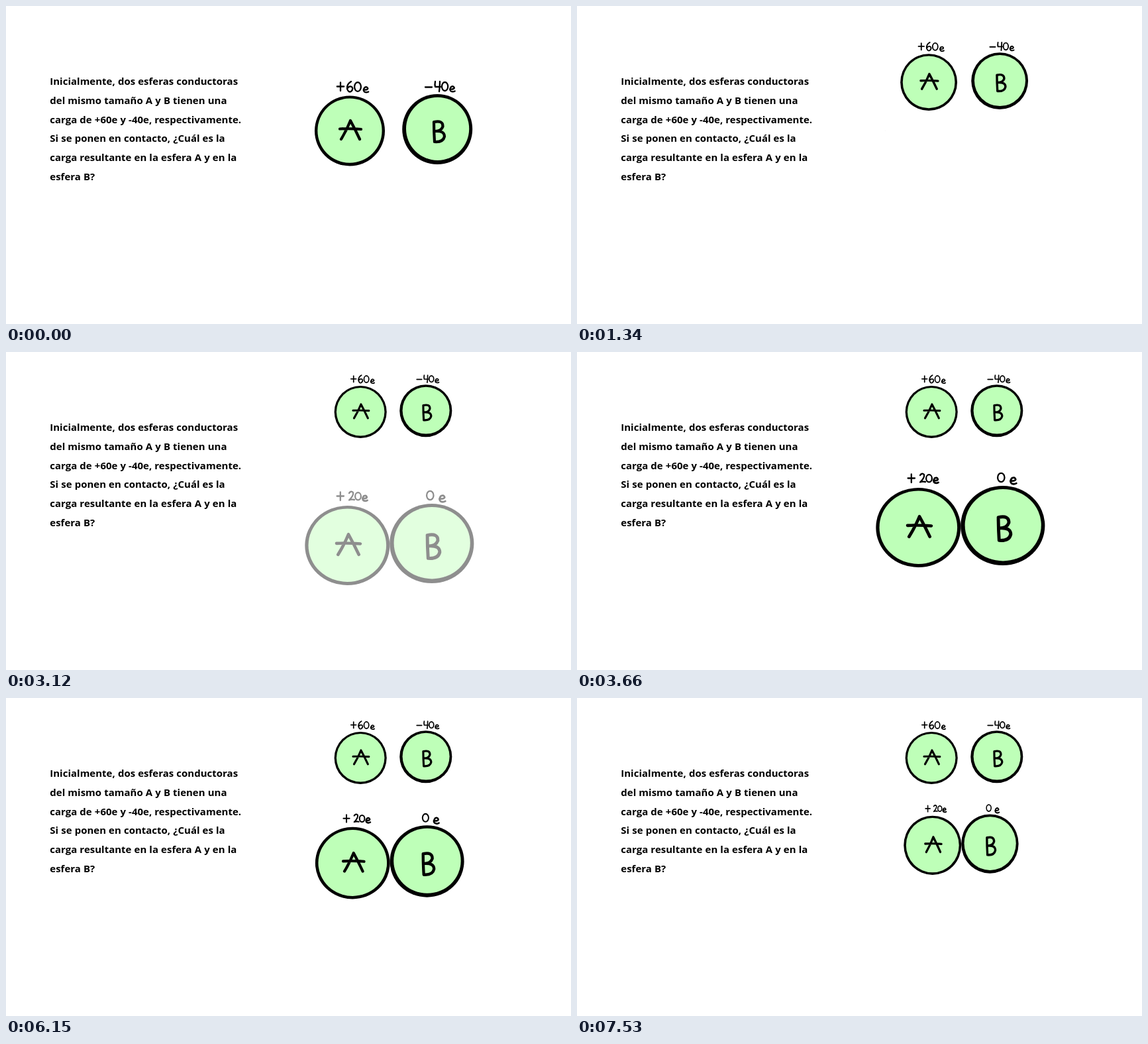
Recreate the animation shown at these times as an HTML page. Size 853 by 480 pixels, loop 8000 ms.

```html
<!DOCTYPE html>
<html lang="es">
<head>
<meta charset="utf-8">
<title>Esferas conductoras</title>
<style>
  html, body { margin: 0; width: 100%; height: 100%; overflow: hidden; background: #fff; }
  svg { display: block; width: 853px; height: 480px; }
  text { font: bold 15px "Open Sans", "Noto Sans", sans-serif; word-spacing: .2px; }
  .ink { fill: none; stroke: #000; stroke-width: 2.3; stroke-linecap: round; stroke-linejoin: round; }
  .letter { stroke-width: 4.2; }
  .fill { fill: #beffb8; }
</style>
</head>
<body>
<svg viewBox="0 0 853 480">
  <defs>
    <path id="a" d="M-14 14Q-6 1 0-14Q7-1 14 14M-16-1.5Q0-2.5 16-1"/>
    <path id="b" d="M-8-15Q-8 0-7 15M-8-15Q6-18 5.5-8Q3-1-6-1Q8-2 8 7Q6 16-7 15"/>
    <path id="plus" d="M-5.2 0H5.2M0-6V6.5"/>
    <path id="e" d="M-3.3.5Q3 1 3.3-1.5Q2-5-1.5-3Q-4.5 1-2 3.5Q1 5.3 4.2 3.4"/>
  </defs>

  <g id="problem"></g>

  <g id="apart">
    <circle cx="519" cy="188.5" r="53"/>
    <circle class="fill" cx="519" cy="188.2" r="48.6"/>
    <circle cx="651.2" cy="186" r="53"/>
    <circle class="fill" cx="651.6" cy="185.3" r="47.6"/>
    <g class="ink letter">
      <use href="#a" x="520" y="187"/>
      <use href="#b" x="654" y="190"/>
    </g>
    <g class="ink">
      <use href="#plus" x="505" y="121.5"/>
      <path d="M521 114Q514 118 515 125Q517 131 521 129Q525 125 522 122Q518 120 515 125"/>
      <ellipse cx="531" cy="122" rx="4.9" ry="6.8"/>
      <use href="#e" x="543" y="126"/>
      <path d="M633 122.5H643M648 114Q647 119 648 122H656M655 114Q655 122 654 129"/>
      <ellipse cx="662.6" cy="121.5" rx="4.6" ry="6.5"/>
      <use href="#e" x="673.5" y="125"/>
    </g>
  </g>

  <g id="joined">
    <ellipse cx="515.3" cy="265" rx="64" ry="60"/>
    <ellipse class="fill" cx="515.3" cy="264.8" rx="58.8" ry="55.2"/>
    <ellipse cx="642.8" cy="262" rx="63.6" ry="60"/>
    <ellipse class="fill" cx="643.2" cy="261.3" rx="57.6" ry="54.2"/>
    <g class="ink letter">
      <use href="#a" transform="translate(517 263.5) scale(1.12 1.09)"/>
      <use href="#b" transform="translate(645.5 267) scale(1.17 1.16)"/>
    </g>
    <g class="ink">
      <use href="#plus" x="504.8" y="190.5"/>
      <path d="M518 186Q521 182 524 185Q525 190 518 196.5Q521 195 526 196"/>
      <ellipse cx="531.5" cy="190.8" rx="4.4" ry="5.6"/>
      <use href="#e" x="541.5" y="193.5" stroke-width="2.7"/>
      <ellipse cx="640.3" cy="189.5" rx="5.2" ry="6.6"/>
      <use href="#e" transform="translate(658.3 194) scale(1.2)"/>
    </g>
  </g>
</svg>
<script>
  const LOOP = 8000, STEP = 60;
  const byId = id => document.getElementById(id);
  const apart = byId("apart"), joined = byId("joined");

  const lines = [
    "Inicialmente, dos esferas conductoras",
    "del mismo tamaño A y B tienen una",
    "carga de +60e y -40e, respectivamente.",
    "Si se ponen en contacto, ¿Cuál es la",
    "carga resultante en la esfera A y en la",
    "esfera B?"
  ];
  byId("problem").innerHTML = lines
    .map((line, i) => `<text x="66.3" y="${119 + 28.8 * i}">${line}</text>`)
    .join("");

  // cubic-bezier(.25, .1, .25, 1)
  function ease(x) {
    if (x <= 0) return 0;
    if (x >= 1) return 1;
    let s = x;
    for (let i = 0; i < 8; i++) {
      s -= (0.75 * s * (1 - s) + s ** 3 - x) / (0.75 - 1.5 * s + 3 * s * s);
    }
    return 0.3 * s * (1 - s) ** 2 + 3 * s * s * (1 - s) + s ** 3;
  }

  // Time since start, held for one step at a time, plus the lead of the first step
  const held = (t, start, lead) =>
    t < start ? 0 : Math.floor((t - start) / STEP) * STEP + lead;

  const shrink = (t, start) => ease(held(t, start, 30) / 1930);

  function pose(p, sx, sy, dx, dy) {
    return `matrix(${1 + (sx - 1) * p} 0 0 ${1 + (sy - 1) * p} ${dx * p} ${dy * p})`;
  }

  function draw(now) {
    const t = now % LOOP;
    apart.setAttribute("transform", pose(shrink(t, 500), 0.746, 0.745, 148, -49.9));

    const rise = Math.min(1, held(t, 2760, 60) / 960);
    joined.setAttribute("opacity", rise);
    joined.setAttribute("transform",
      `translate(0 ${48 * (1 - rise)}) ` + pose(shrink(t, 5730), 0.679, 0.744, 186.9, 25.1));
  }

  const begin = performance.now();
  function tick() {
    draw(performance.now() - begin);
    requestAnimationFrame(tick);
  }
  tick();
</script>
</body>
</html>
```
